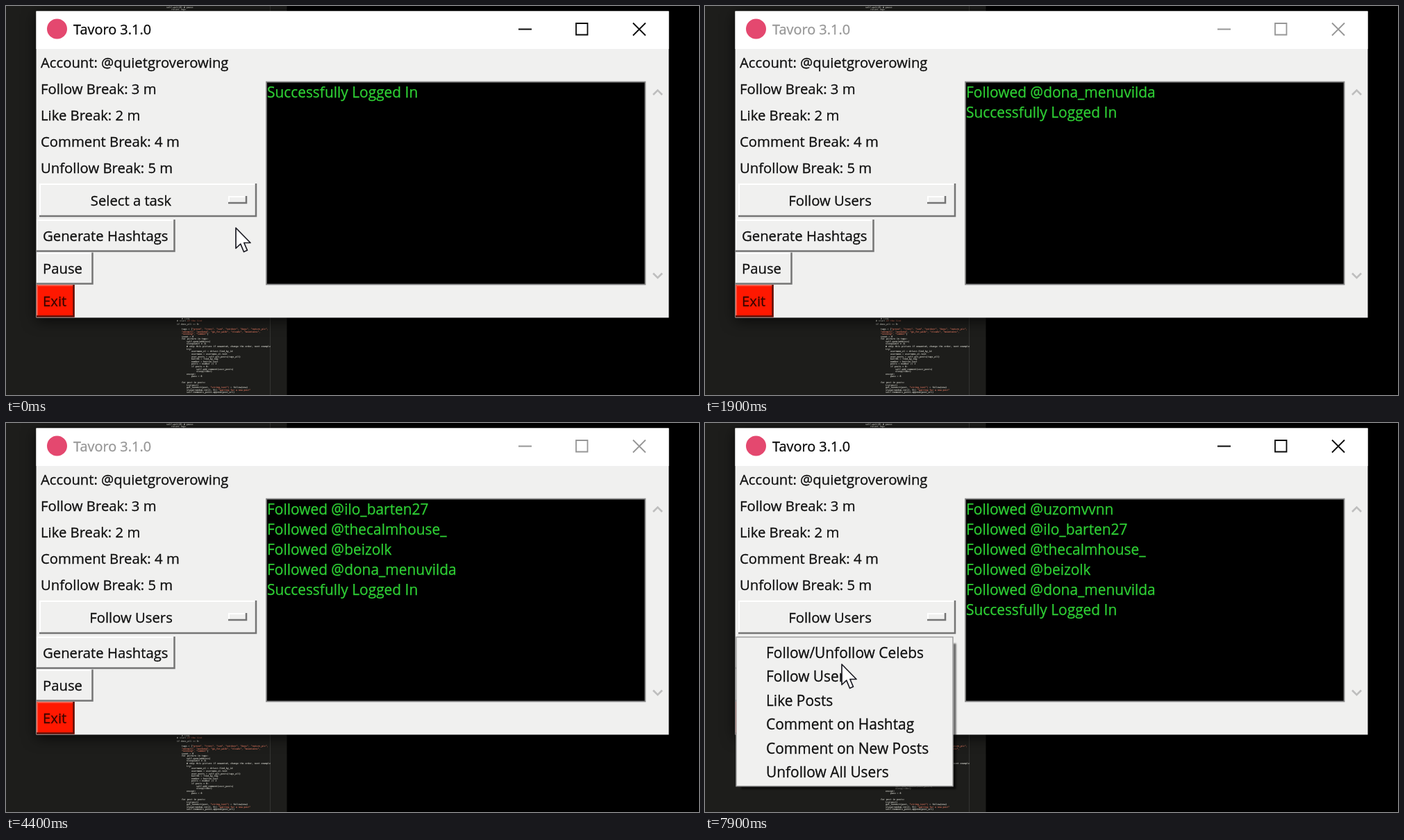
Recreate the animation shown at these times as an HTML page. Size 998 by 561 pixels, loop 8000 ms.

```html
<!DOCTYPE html>
<html lang="en">
<head>
<meta charset="utf-8">
<title>Task window</title>
<style>
html, body { margin: 0; width: 100%; height: 100%; overflow: hidden; background: #000; }
svg { display: block; width: 998px; height: 561px; }
text { font: 20.9px "Open Sans", "Noto Sans", sans-serif; white-space: pre; }
#title text { font-size: 19.9px; }
#controls text { font-size: 20.3px; }
#title text, #controls text, #menu text { stroke: currentColor; stroke-width: .3; }
#code text { font: 3.2px "DejaVu Sans Mono", monospace; stroke: #c8c8c0; stroke-width: .12; }
#code tspan { fill: #d0705a; stroke: #d0705a; }
#frame { filter: drop-shadow(0 4px 10px rgba(0, 0, 0, .7)); }
#log { fill: #2fd135; stroke: #2fd135; stroke-width: .25; }
#shade { filter: blur(1.2px); }
</style>
</head>
<body>
<svg viewBox="0 0 998 561">
  <rect width="998" height="561"/>
  <rect width="404.5" height="561" fill="#1d1d1b"/>
  <path d="M380.5 0V561" stroke="#343432"/>
  <g id="code"></g>

  <rect id="frame" x="43.5" y="7.5" width="911" height="442" fill="#f0f0ef"/>
  <rect x="43.5" y="7.5" width="911" height="54.5" fill="#fff"/>
  <circle cx="73.5" cy="33" r="14.5" fill="#e4486f"/>
  <g id="title">
    <text x="97" y="41" fill="currentColor">Tavoro 3.1.0</text>
    <path d="M738 33.5H757M821 25H837.5V41.5H821ZM903 24.5L921 42.5M921 24.5L903 42.5"
      fill="none" stroke="currentColor" stroke-width="1.8"/>
  </g>

  <g id="controls" fill="#101010" color="#101010"></g>
  <rect x="375" y="109.5" width="545.5" height="292" stroke="#858585" stroke-width="1.8"/>
  <g id="log"></g>
  <path d="M932 128L938.5 121.5L945 128M932 385.5L938.5 392L945 385.5"
    fill="none" stroke="#bebebe" stroke-width="2.6"/>

  <path id="shade" d="M359.5 318V526H52" fill="none" stroke="#000" stroke-opacity=".6" stroke-width="4"/>
  <g id="menu" color="#101010">
    <rect x="45" y="308.7" width="312" height="215" fill="#f0f0ef" stroke="#a0a0a0" stroke-width="1.5"/>
  </g>
  <path id="cursor" d="M0 0V29.5L6.8 23.2L11.5 34.5L16.5 32.3L11.8 21.5H21Z"
    fill="#fff" stroke="#1c1c24" stroke-width="1.7" stroke-linejoin="round"/>
</svg>
<script>
const LOOP = 8000, STEP = 100;
const $ = id => document.getElementById(id);
const add = (id, markup) => $(id).insertAdjacentHTML('beforeend', markup);
const label = (x, y, s, attrs = '') => `<text x="${x}" y="${y}" ${attrs}>${s}</text>`;

function raised(x, y, w, h, face = '#f0f0ef', light = '#fff', dark = '#757575') {
  const r = x + w, b = y + h;
  return `<rect x="${x}" y="${y}" width="${w}" height="${h}" fill="${face}"/>
    <path d="M${x + 1} ${b}V${y + 1}H${r}" fill="none" stroke="${light}" stroke-width="2"/>
    <path d="M${x} ${b - 1}H${r - 1}V${y}" fill="none" stroke="${dark}" stroke-width="2.5"/>`;
}

// Editor text behind the window: x, y, plain part, string part, plain rest
[
  [231, 2.5, 'self.wait(8) # pause'], [238, 5.8, 'return tags'],
  [253, 451.5, '# loop'], [246, 455, '# start', ' of the list'], [246, 459.5, 'if done_all == 0:'],
  [253, 467, 'tags = [', '"green", "trees", "sun", "outdoor", "days", "nature_pic",'],
  [253, 470.5, '', '"animals", "weekend", "go_for_walk", "clouds", "mountains",'],
  [253, 474, '', '"evening", "summer"', ']'], [253, 477.6, 'count = 0'],
  [253, 481.2, 'for picture in tags:'], [260, 484.8, 'self.open(address)'],
  [260, 488.4, 'sleep(wait + 2)'], [260, 492, '# skip this picture if unwanted, change the order, next example'],
  [260, 495.6, 'try:'], [267, 499.4, 'username_el = driver.find_by_id'],
  [267, 503, 'username = username_el.text'], [267, 506.6, 'user_posts = self.get_posts(tags_all)'],
  [267, 510.2, 'button = find_by_tag'], [267, 513.8, 'number = button.text'],
  [267, 517.4, 'posts = number // 2'], [267, 521, 'if posts > 0:'],
  [274, 524.6, 'self.add_comment(user_posts)'], [274, 528.2, 'sleep(timer)'],
  [260, 531.8, 'except:'], [267, 535.4, 'pass = 0'],
  [253, 543.5, 'for post in posts:'], [260, 547.5, 'try(post)'],
  [260, 551, 'get_connect(post, ', '"string_text")', ' = follow(new)'],
  [260, 554.6, 'sleep(random.int(2, 9)) ', '"waiting for a new post"'],
  [260, 558.2, 'self.comments_posts.append(post_url)']
].forEach(([x, y, plain, quoted = '', rest = '']) =>
  add('code', label(x, y, `${plain}<tspan>${quoted}</tspan>${rest}`, 'fill="#c8c8c0"')));

['Account: @quietgroverowing', 'Follow Break: 3 m', 'Like Break: 2 m',
 'Comment Break: 4 m', 'Unfollow Break: 5 m'
].forEach((s, i) => add('controls', label(50, 89 + 38 * i, s)));

add('controls',
  raised(48, 256, 313, 48) + raised(320, 274, 27, 11) +
  label(180, 288, '', 'id="task" text-anchor="middle"') +
  raised(44, 308, 199.5, 46.5) + label(53, 339, 'Generate Hashtags') +
  raised(44, 355.5, 81.5, 46) + label(53, 386, 'Pause') +
  raised(44, 402, 54.5, 46.5, '#ff1800', '#ff5a48', '#5c1008') +
  label(53, 433, 'Exit', 'fill="#3a0600" color="#3a0600"'));

['Follow/Unfollow Celebs', 'Follow Users', 'Like Posts', 'Comment on Hashtag',
 'Comment on New Posts', 'Unfollow All Users'
].forEach((s, i) => add('menu', label(88, 339 + 34.4 * i, s, 'fill="#101010"')));

const lines = ['Successfully Logged In',
  ...['dona_menuvilda', 'beizolk', 'thecalmhouse_', 'ilo_barten27', 'uzomvvnn'].map(n => 'Followed @' + n)];
lines.forEach(s => add('log', label(376, 0, s)));
const logRows = [...$('log').children];

// Pointer stops: time, x, y
const path = [[0, 331, 320], [400, 236, 291], [600, 236, 291], [1100, 237, 371], [1400, 237, 371],
  [6400, 300, 375], [6700, 235, 291], [6900, 235, 291], [7600, 197, 348], [LOOP, 197, 348]];

const clamp = v => Math.max(0, Math.min(1, v));
const show = (id, on) => $(id).setAttribute('visibility', on ? 'visible' : 'hidden');

function pointer(t) {
  const i = path.findIndex(p => p[0] > t);
  const [t0, x0, y0] = path[i - 1], [t1, x1, y1] = path[i];
  const u = (t - t0) / (t1 - t0), e = u * u * (3 - 2 * u);
  return [x0 + (x1 - x0) * e, y0 + (y1 - y0) * e];
}

function draw(t) {
  const away = t >= 1500 && t < 6700;
  $('title').setAttribute('color', away ? '#969696' : '#080808');
  $('task').textContent = t < 1200 ? 'Select a task' : 'Follow Users';

  const newest = t < 1800 ? 0 : Math.min(5, 1 + Math.floor((t - 1800) / 750));
  logRows.forEach((row, i) => {
    row.setAttribute('y', 132 + 29 * (newest - i));
    row.setAttribute('visibility', i <= newest ? 'visible' : 'hidden');
  });

  // The menu fades in, its shadow appears at once
  const opened = t < 1200 ? t - 450 : t - 6750;
  $('menu').setAttribute('opacity', clamp(opened / 200));
  show('shade', opened > 0);

  $('cursor').setAttribute('transform', `translate(${pointer(t)})`);
  show('cursor', t < 1500 || t >= 6400);
}

const start = performance.now();
function tick() {
  const t = (performance.now() - start) % LOOP;
  draw(Math.floor(t / STEP) * STEP);
  requestAnimationFrame(tick);
}
tick();
</script>
</body>
</html>
```
